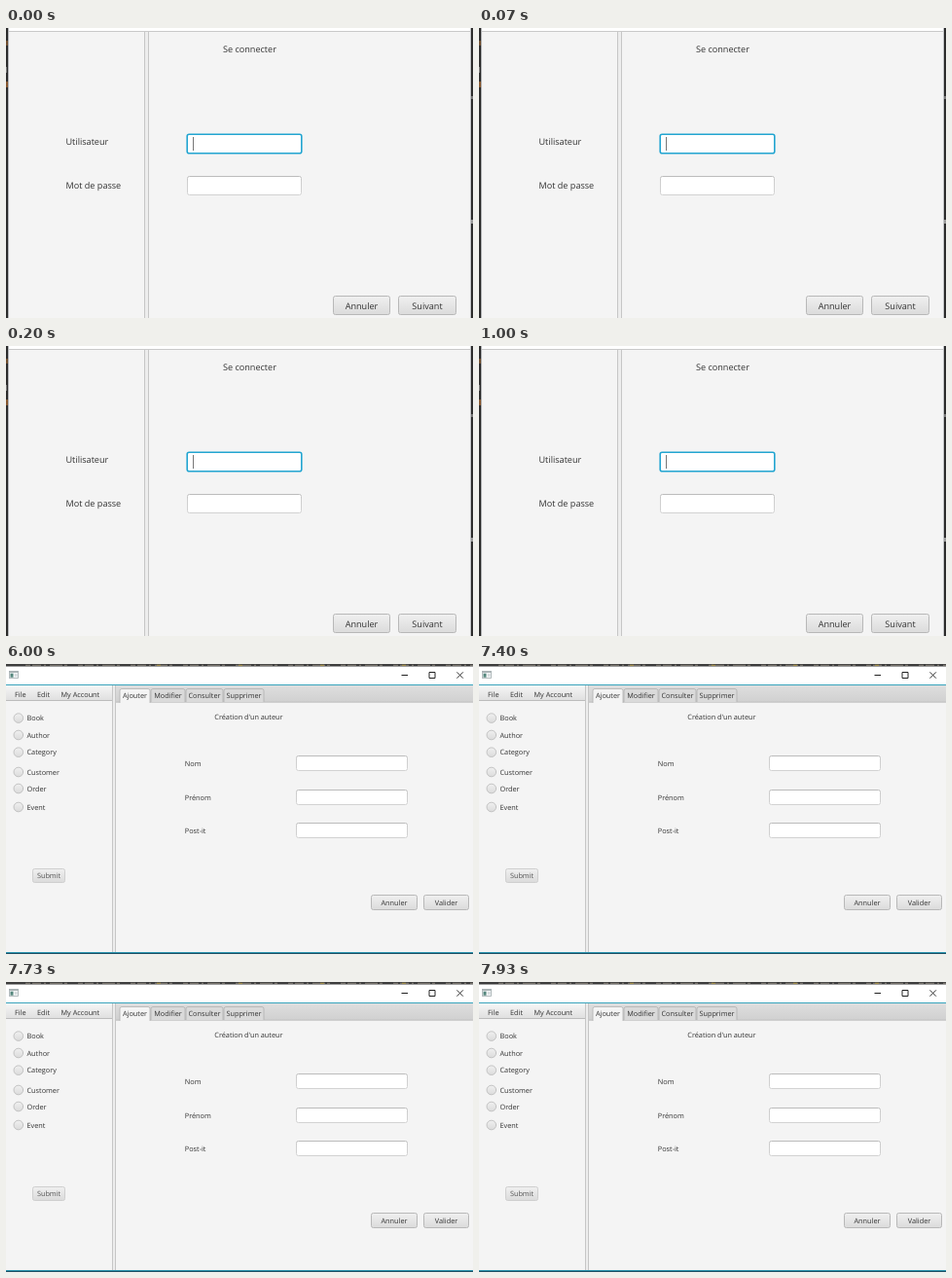
An HTML page for the animation above (8 s loop, 480 by 298 pixels).

```html
<!DOCTYPE html>
<html lang="fr">
<head>
<meta charset="utf-8">
<title>Formulaires</title>
<style>
html, body { margin: 0; width: 100%; height: 100%; overflow: hidden; background: #f4f4f4; }
svg { display: block; width: 100vw; height: 100vh; }
text { font-family: "Open Sans", "Noto Sans", sans-serif; font-size: 7.3px; fill: #333; text-rendering: geometricPrecision; }
#login text { font-size: 9.1px; }
.scene { visibility: hidden; animation: 8s step-end infinite; }
#login { animation-name: login; }
#menu { animation-name: menu; }
#author { animation-name: author; }
@keyframes login { 0% { visibility: visible } 37.5%, 100% { visibility: hidden } }
@keyframes menu { 0% { visibility: hidden } 37.5% { visibility: visible } 75%, 100% { visibility: hidden } }
@keyframes author { 0% { visibility: hidden } 75%, 100% { visibility: visible } }
</style>
</head>
<body>
<svg viewBox="0 0 480 298" preserveAspectRatio="none">
  <defs>
    <linearGradient id="button" x2="0" y2="1"><stop stop-color="#f0f0f0"/><stop offset="1" stop-color="#dbdbdb"/></linearGradient>
    <linearGradient id="bar" x2="0" y2="1"><stop stop-color="#f6f6f6"/><stop offset="1" stop-color="#dedede"/></linearGradient>
    <linearGradient id="tabs" x2="0" y2="1"><stop stop-color="#dedede"/><stop offset="1" stop-color="#d0d0d0"/></linearGradient>
    <linearGradient id="field" x2="0" y2="1"><stop stop-color="#bcbcbc"/><stop offset=".25" stop-color="#cecece"/><stop offset="1" stop-color="#d2d2d2"/></linearGradient>
  </defs>
  <g class="scene" id="login"></g>
  <g class="scene" id="menu"></g>
  <g class="scene" id="author"></g>
</svg>
<script>
const rect = (x, y, w, h, fill, extra = '') =>
  `<rect x="${x}" y="${y}" width="${w}" height="${h}" fill="${fill}" ${extra}/>`;
const label = (x, y, text, extra = '') => `<text x="${x}" y="${y}" ${extra}>${text}</text>`;
const path = (d, stroke, width = 1, extra = '') =>
  `<path d="${d}" fill="none" stroke="${stroke}" stroke-width="${width}" ${extra}/>`;
const field = (x, y, w, h) =>
  rect(x + .5, y + .5, w - 1, h - 1, '#fff', 'rx="2" stroke="url(#field)"');
const button = (x, y, w, h, text, baseline, border = '#b8b8b8', ink = '#333') =>
  rect(x + .5, y + .5, w - 1, h - 1, 'url(#button)', `rx="2" stroke="${border}"`) +
  label(x + w / 2, baseline, text, `text-anchor="middle" style="fill:${ink}"`);
const splitter = (x, y, w, h) =>
  rect(x, y, w, h, '#ededed') + rect(x, y, 1, h, '#c6c6c6') + rect(x + w - 1, y, 1, h, '#c6c6c6');

function loginScene() {
  return rect(0, 0, 480, 298, '#f4f4f4') +
    rect(0, 0, 480, 3, '#fff') + rect(0, 3, 480, 1, '#c9c9c9') +
    splitter(142, 4, 5, 294) +
    rect(0, 0, 2, 298, '#2b2b2b') + rect(2, 0, 1, 298, '#b5b7b9') +
    rect(478, 0, 2, 298, '#2b2b2b') + rect(477, 0, 1, 298, '#c4c6c8') +
    rect(0, 13, 2, 5, '#6f4c2c') + rect(0, 40, 1, 6, '#777') + rect(0, 55, 2, 6, '#85552d') +
    rect(478, 70, 2, 3, '#777') + rect(478, 197, 2, 4, '#999') +
    label(223, 25, 'Se connecter') +
    label(61.5, 120, 'Utilisateur') + label(61.5, 165.3, 'Mot de passe') +
    rect(186.2, 109.2, 117.6, 19.6, '#fff', 'rx="2" stroke="#22a5d1" stroke-width="1.6"') +
    rect(192, 112, 1, 14, '#777') +
    field(186, 152, 118, 20) +
    button(336, 275, 59, 20, 'Annuler', 289) + button(403, 275, 60, 20, 'Suivant', 289);
}

// Window frame, menu bar and radio list shared by the two main views.
function mainWindow({ top, line, controls, controlY, shift, radios }) {
  const [min, max, close] = controls, y = controlY;
  const menuY = line + 1;
  return rect(0, 0, 480, 298, '#f4f4f4') +
    rect(0, 0, 480, 21, '#fff') + rect(0, 0, 480, top, '#3c3c3c') +
    path(`M20 ${top / 2}H480`, '#77736c', top / 2, 'stroke-dasharray="5 2 9 3 2 4 13 2 3 11"') +
    path(`M155 ${top / 2}H480`, '#a08d4c', top / 2, 'stroke-dasharray="4 80"') +
    rect(3.5, y - 3.5, 9, 7, '#f3f5f6', 'stroke="#a3adb0" stroke-width=".8"') +
    rect(3.5, y - 3.5, 9, 1.4, '#a3adb0') + rect(4.5, y - 1.3, 3, 4, '#55877d') +
    rect(9, y - 1, 2.6, 3, '#d8dddf') +
    path(`M${min} ${y + .5}h6.5M${max + .5} ${y - 2.5}h6v6h-6z`, '#222') +
    path(`M${close} ${y - 2.7}l6.4 6.4m0 -6.4l-6.4 6.4`, '#222', .9) +
    rect(0, line, 480, 1.2, '#3aa4bc') +
    rect(0, menuY, 109, 38 - menuY, 'url(#bar)') + rect(0, 37, 109, 1, '#bcbcbc') +
    splitter(109, menuY, 4, 296 - menuY) +
    label(9, 33 + shift, 'File') + label(31.8 + shift / 2, 33 + shift, 'Edit') +
    label(56.5, 33 + shift, 'My Account') +
    ['Book', 'Author', 'Category', 'Customer', 'Order', 'Event'].map((name, i) =>
      `<circle cx="12.8" cy="${radios[i]}" r="4.8" fill="url(#button)" stroke="#bebebe" stroke-width=".9"/>` +
      label(21 + shift, radios[i] + 2.7, name)).join('');
}

function menuScene() {
  return mainWindow({
    top: 1, line: 20, controls: [407.5, 436, 465], controlY: 10, shift: 0,
    radios: [55, 72.5, 90.2, 110.5, 127.5, 147]
  }) + rect(0, 297, 480, 1, '#34a0b8') +
    button(27, 210, 35, 16, 'Submit', 220.8);
}

function authorScene() {
  const tabs = [['Ajouter', 117, 31], ['Modifier', 149, 35], ['Consulter', 185, 38], ['Supprimer', 224, 41]];
  return mainWindow({
    top: 2.5, line: 21, controls: [406.5, 434.5, 463.5], controlY: 11, shift: .5,
    radios: [55.6, 73, 90.7, 111, 128, 147]
  }) +
    rect(0, 296, 480, 1, '#2b93ad') + rect(0, 297, 480, 1, '#1d4f63') +
    button(27, 210, 34, 15, 'Submit', 220.3, '#cfcfcf', '#555') +
    rect(113, 22.2, 367, 17.3, 'url(#tabs)') + rect(113, 38.7, 367, .8, '#bdbdbd') +
    tabs.map(([name, x, w], i) =>
      `<path d="M${x} ${i ? 39 : 40}V27.5q0 -2 2 -2h${w - 4}q2 0 2 2v${i ? 11.5 : 12.5}" fill="${i ? '#dadada' : '#f4f4f4'}" stroke="#b0b0b0" stroke-width=".8"/>` +
      label(x + w / 2, 35.4, name, 'text-anchor="middle"')).join('') +
    label(214.3, 57, "Création d'un auteur") +
    [['Nom', 94], ['Prénom', 129], ['Post-it', 163]].map(([name, y]) =>
      label(183.8, y + 10.7, name) + field(298, y, 115, 16)).join('') +
    button(375, 237, 48, 16, 'Annuler', 247.8) + button(429, 237, 47, 16, 'Valider', 247.8);
}

document.getElementById('login').innerHTML = loginScene();
document.getElementById('menu').innerHTML = menuScene();
document.getElementById('author').innerHTML = authorScene();
</script>
</body>
</html>
```
